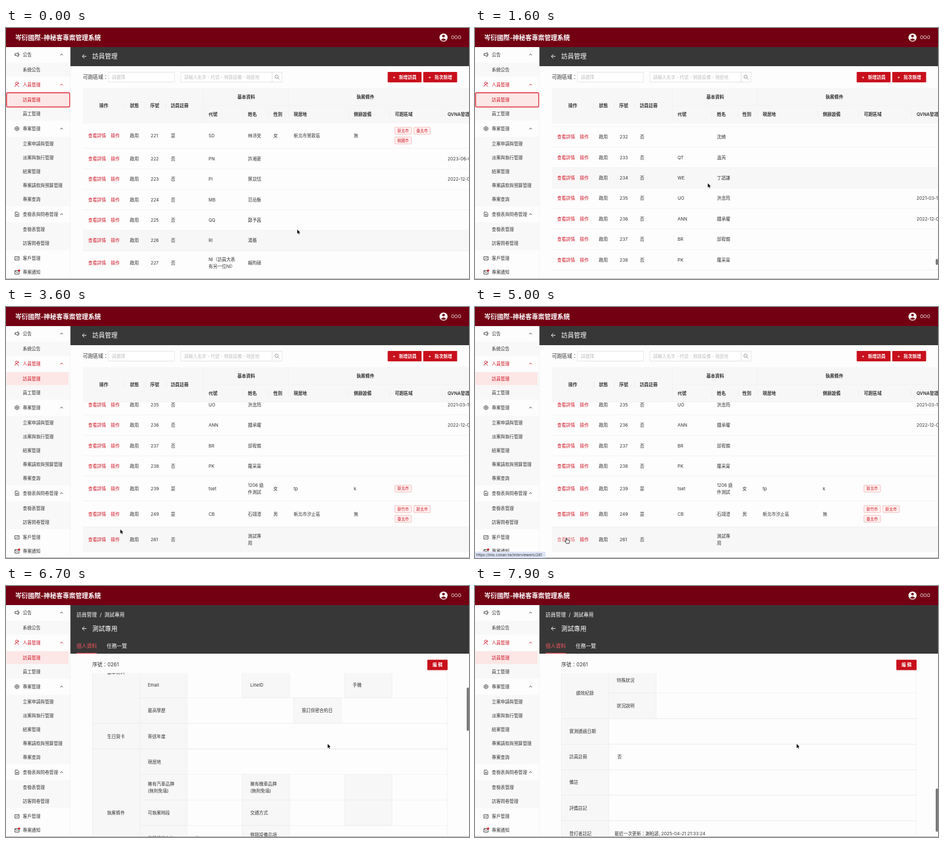
Animation, 800 px wide and 434 px high, one loop 8 s. Source, as an HTML page:

```html
<!DOCTYPE html>
<html lang="zh-Hant">
<head>
<meta charset="utf-8">
<style>
html, body { margin: 0; width: 100%; height: 100%; overflow: hidden; background: #fdfdfd; }
svg { display: block; width: 800px; height: 434px; }
text { font: 7.65px Inter, "Noto Sans CJK TC", "Noto Sans CJK", sans-serif; fill: #333; white-space: pre; }
.b { font-weight: 600; }
.m { font-size: 8.75px; }
.l { font-size: 10.9px; font-weight: 500; }
.h { font-size: 11px; font-weight: 600; }
.s { font-size: 6.6px; }
.w { fill: #fff; }
.r { fill: #cf1322; }
.p { fill: #f0565c; }
.g { fill: #bfbfbf; }
.c { text-anchor: middle; }
.icon { fill: none; stroke: #333; stroke-width: .9; }
.icon.red { stroke: #cf1322; }
</style>
</head>
<body>
<svg id="stage" viewBox="0 0 800 434"></svg>
<script>
const $ = id => document.getElementById(id);
const rect = (x, y, w, h, fill, more = '') =>
  `<rect x="${x}" y="${y}" width="${w}" height="${h}" fill="${fill}" ${more}/>`;
const path = (d, more = 'class="icon"') => `<path d="${d}" ${more}/>`;
const line = (x1, y1, x2, y2, color = '#eee') =>
  path(`M${x1} ${y1}L${x2} ${y2}`, `fill="none" stroke="${color}" stroke-width=".7"`);
const sizes = { h: 11, l: 10.9, m: 8.75, s: 6.6 };

// y is the vertical centre of the text block
function text(x, y, str, cls = '') {
  const size = sizes[cls.split(' ')[0]] || 7.65;
  const lines = str.split('\n');
  return lines.map((s, i) => {
    const base = y + size * .37 + (i - (lines.length - 1) / 2) * 12;
    return `<text x="${x}" y="${base.toFixed(2)}" class="${cls}">${s}</text>`;
  }).join('');
}

const button = (x, y, w, h, label) =>
  rect(x, y, w, h, '#c8101c', 'rx="1"') + text(x + w / 2, y + h / 2, label, 'w c b');

const backArrow = y => path(`M139 ${y}H132M135.3 ${y - 3.4}L131.8 ${y}L135.3 ${y + 3.4}`,
  'fill="none" stroke="#fff" stroke-width="1"');

// ---- frame shared by both pages
const topBar = rect(0, 0, 800, 33, '#730012') +
  text(16, 16.5, '岑衍國際-神秘客專案管理系統', 'h w') +
  '<circle cx="756" cy="16.5" r="7" fill="#fff"/><circle cx="756" cy="14" r="2.3" fill="#730012"/>' +
  path('M751.5 20.5Q756 15.5 760.5 20.5Q756 24 751.5 20.5Z', 'fill="#730012"') +
  text(769, 16.5, 'OOO', 'w');

const icons = {
  46: 'M15.5 44.5H18L21 42.5V49.5L18 47.5H15.5ZM22.5 44.5V47.5',
  98: 'M20.5 95.5A2 2 0 1 1 16.5 95.5A2 2 0 1 1 20.5 95.5M15.3 101.5Q16 98 18.5 98L22.5 101.5M21 94L22 97',
  174: 'M19 170.3L22.3 172.2V175.8L19 177.7L15.7 175.8V172.2ZM20.4 174A1.4 1.4 0 1 1 17.6 174A1.4 1.4 0 1 1 20.4 174',
  322: 'M16 318.3H20L22 320.3V325.7H16ZM17.5 322.7H20.5M19 321.2V324.2',
  398: 'M15.3 395.3H22.7V401.2H15.3ZM17 399.4L18.7 397.6L19.7 398.7L21.5 396.8',
  422: 'M15.3 419.5H22.7V425.5H15.3ZM15.3 420L19 423L22.7 420'
};
const menuItems = [
  [46, '公告', 1], [72, '系統公告'], [98, '人員管理', 1], [124, '訪員管理'], [148, '員工管理'],
  [174, '專案管理', 1], [200, '立案申請與管理'], [224, '派案與執行管理'], [248, '結案管理'],
  [272, '專案請款與預算管理'], [296, '專案查詢'], [322, '查檢表與問卷管理', 1],
  [348, '查檢表管理'], [372, '訪客問卷管理'], [398, '客戶管理'], [422, '專案通知']
];
const sidebar = rect(0, 33, 111, 401, '#fdfdfd') +
  [[60, 24], [112, 48], [188, 120], [336, 48]].map(([y, h]) => rect(0, y, 111, h, '#f8f8f8')).join('') +
  rect(1, 113, 107, 22, '#fde6e6') +
  menuItems.map(([y, label, open]) => {
    const red = y === 98 || y === 124;
    const cls = `class="icon ${red ? 'red' : ''}"`;
    return text(29, y, label, red ? 'r' : '') + (icons[y] ? path(icons[y], cls) : '') +
      (open ? path(`M93.7 ${y + 1.2}L96 ${y - 1.2}L98.3 ${y + 1.2}`, cls) : '');
  }).join('') +
  '<circle cx="22.7" cy="419.3" r="1.8" fill="#d9121f"/>' +
  line(111, 33, 111, 434) +
  rect(1, 112, 109, 24.5, 'none', 'id="focus" rx="2" stroke="#e8505a" stroke-width="1.8"');

// ---- list page: number, code, name, extra cells
const people = [
  [221, 'SD', '林沛芠', { sex: '女', home: '新北市鶯歌區', gear: '無', tags: ['新北市', '臺北市', '桃園市'], h: 44.5 }],
  [222, 'PN', '許湘菱', { date: '2023-06-05' }], [223, 'PI', '葉苡恬', { date: '2022-12-01' }],
  [224, 'MB', '范岳衡'], [225, 'QQ', '鄭予茜'], [226, 'RI', '湯蕎'],
  [227, 'NI（訪員大表\n有另一位NI）', '賴昀碩', { h: 42.5 }],
  [228, 'RC', '周芷瑄', { date: '2021-03-31' }], [229, '', '何小禾'],
  [230, 'YQ', '江映彤', { date: '2023-10-15' }], [232, '', '沈綺'], [233, 'QT', '溫芮'], [234, 'WE', '丁語謙'],
  [235, 'UO', '洪念筠', { date: '2021-03-15' }], [236, 'ANN', '鍾承曜', { date: '2022-12-05' }],
  [237, 'BR', '邱宥嫻'], [238, 'PK', '羅采甯'],
  [239, 'tset', '1206 退\n件測試', { sex: '女', home: 'tp', gear: 'k', tags: ['新北市'], h: 42.5 }],
  [249, 'CB', '石翊澄', { sex: '男', home: '新北市汐止區', gear: '無', tags: ['新竹市', '新北市', '臺北市'], h: 45 }],
  [261, '', '測試專\n用', { h: 43 }]
];
let listBottom = 163.8;
const rows = people.map(([no, code, name, x = {}]) => {
  const h = x.h || 35.4, y = listBottom, mid = y + h / 2;
  listBottom += h;
  const tags = (x.tags || []).map((s, i, all) => {
    const tx = 672 + i % 2 * 32.7;
    const ty = mid + (all.length > 2 ? (i < 2 ? -8.4 : 8.4) : 0);
    return rect(tx, ty - 6, 28.5, 12, '#fff1f0', 'rx="1" stroke="#f3a6a6" stroke-width=".7"') +
      text(tx + 14.25, ty, s, 's r c');
  }).join('');
  const svg = `<g class="link">${text(142, mid, '查看詳情', 'r')}</g>` + text(181, mid, '操作', 'r') +
    text(214, mid, '啟用') + text(250, mid, String(no)) + text(285, mid, x.sex ? '是' : '否') +
    text(350, mid, code) + text(418, mid, name) + text(462, mid, x.sex || '') + text(497, mid, x.home || '') +
    text(601, mid, x.gear || '') + tags + text(763, mid, x.date || '') + line(133, listBottom, 800, listBottom);
  return { y, h, svg };
});

const heads = [[169, 134, '操作'], [222, 134, '狀態'], [257, 134, '序號'], [300, 134, '訪員註冊'],
  [415, 119, '基本資料'], [621, 119, '執案條件']];
const subHeads = [[350, '代號'], [418, '姓名'], [462, '性別'], [497, '現居地'], [601, '側錄設備'],
  [672, '可跑區域'], [763, 'QVNA發證日']];
const tableHead = rect(133, 104, 667, 60, '#f7f7f7') +
  heads.map(([x, y, s]) => text(x, y, s, 'b c')).join('') +
  subHeads.map(([x, s]) => text(x, 149, s, 'b')).join('') +
  [205, 241, 276].map(x => line(x, 128, x, 140, '#e8e8e8')).join('') +
  [409, 454, 488, 592, 663, 754].map(x => line(x, 143, x, 155, '#e8e8e8')).join('') +
  line(341, 104, 341, 164) + line(488, 104, 488, 134) + line(341, 134, 800, 134) + line(133, 164, 800, 164);

const field = 'stroke="#d9d9d9" stroke-width=".7"';
const listPage = rect(111, 33, 689, 33, '#373737') + backArrow(49) + text(149, 49, '訪員管理', 'l w') +
  text(133, 85, '可跑區域：', 'm') +
  rect(177, 76.5, 114, 17, '#fff', field) + text(183, 85, '請選擇', 'g') +
  rect(302, 76.5, 158, 17, '#fff', field) + text(308, 85, '請輸入名字、代號、側錄設備、現居地', 'g') +
  rect(460, 76.5, 17, 17, '#fff', field) +
  path('M470.3 84.2A2.8 2.8 0 1 1 464.7 84.2A2.8 2.8 0 1 1 470.3 84.2M469.5 86.3L472 88.8',
    'fill="none" stroke="#777" stroke-width=".8"') +
  button(659.5, 76, 58.5, 18, '+   新增訪員') + button(721, 76, 58.5, 18, '+   批次新增') +
  '<g clip-path="url(#listClip)">' + rect(133, 0, 667, 35, '#f7f7f7', 'id="hover"') +
  '<g id="rows">' + rows.map(r => r.svg).join('') + '</g></g>' + tableHead;

// ---- detail page: sections of rows; each row is [labels, values, height]
const sections = [
  ['基本資料', [
    [[[231, '身分證字號'], [408, '姓名'], [585, '代號']], [[323, 'B135792468'], [505, '測試專用']]],
    [[[231, '性別'], [408, '生日'], [585, '婚姻']], [[328, '其他'], [500, '2025/02/04']]],
    [[[231, 'Email'], [408, 'LineID'], [585, '手機']]],
    [[[231, '最高學歷'], [497, '簽訂保密合約日']]]]],
  ['生日賀卡', [[[[231, '寄送年度']]]]],
  ['執案條件', [
    [[[231, '現居地']]],
    [[[231, '擁有汽車品牌\n(無則免填)'], [408, '擁有機車品牌\n(無則免填)'], [585, '']]],
    [[[231, '可執案時段'], [408, '交通方式'], [585, '']]],
    [[[231, '側錄設備有無'], [408, '側錄設備品項\n(無則免填)']], [[328, '無']]],
    [[[231, '可跑區域'], [497, '手機品牌']]]]],
  ['能力培訓', [
    [[[231, '證照有無及意願']]],
    [[[231, 'QVAA/發證日'], [408, 'VQN/發證日'], [585, '顧問神秘客/發證日', 90]]],
    [[[231, '神秘客培訓經歷\n(請填寫接受神\n秘客培訓的課程\n名稱)'], [497, '課程完訓日期']], [], 59]]],
  ['工作經歷', [[[[231, '產業']]], [[[231, '職務']]], [[[231, '年資']]]]],
  ['績效紀錄', [[[[231, '特殊狀況']]], [[[231, '狀況說明']]]]],
  ...[['實測通過日期'], ['訪員註冊', 246, '否'], ['備註'], ['評鑑註記'],
    ['登打者註記', 241, '最近一次更新：謝柏諺, 2025-04-21 21:33:24']]
    .map(([name, x, value]) => [name, [[[], x ? [[x, value]] : []]], true])
];
const edge = 'stroke="#ececec" stroke-width=".7"';
let bottom = 151;
const detailRows = sections.map(([name, list, alignLeft]) => {
  const start = bottom;
  const body = list.map(([labels, values = [], h = 44.15]) => {
    const y = bottom, mid = y + h / 2;
    bottom += h;
    return line(231, y, 763, y) +
      labels.map(([x, s, w = 82]) => rect(x, y, w, h, '#f7f7f7', edge) + text(x + 14, mid, s)).join('') +
      values.map(([x, s]) => text(x, mid, s)).join('');
  }).join('');
  const h = bottom - start;
  return rect(149.5, start, 613, h, 'none', edge) + rect(149.5, start, 82, h, '#f7f7f7', edge) + body +
    text(alignLeft ? 163 : 190, start + h / 2, name, alignLeft ? '' : 'c');
}).join('');

const detailPage = rect(111, 33, 689, 84, '#373737') + text(122, 50, '訪員管理  /  測試專用', 'm w') +
  backArrow(73.5) + text(149, 73.5, '測試專用', 'l w') +
  text(122, 103.5, '個人資料', 'm p') + text(174, 103.5, '任務一覽', 'm w') + rect(122, 115.7, 35, 1.3, '#f0565c') +
  text(149, 136, '序號：0261', 'm') + button(728, 127.5, 35, 18, '編 輯') +
  `<g clip-path="url(#detailClip)"><g id="detailRows">${detailRows}</g></g>`;

const arrow = path('M0 0V8.3L1.9 6.6L3.1 9.3L4.6 8.6L3.4 6H5.9Z',
  'fill="#000" stroke="#fff" stroke-width=".6" id="arrow"');
const hand = path('M-1.8 0V-4Q-1 -5.4 -.3 -4V-1.2Q1 -2 1.6 -.9Q2.7 -1.5 3.2 -.3Q4.4 -.6 4.4 1L3.7 4.8H-1L-3.6 1.2Q-3.3 .1 -1.8 1.4Z',
  'fill="#fff" stroke="#000" stroke-width=".8" id="hand"');

$('stage').innerHTML = `<defs><clipPath id="listClip">${rect(133, 164, 667, 259.5, '#000')}</clipPath>
  <clipPath id="detailClip">${rect(149, 150.6, 615, 283, '#000')}</clipPath></defs>` +
  rect(0, 0, 800, 434, '#fdfdfd') + `<g id="list">${listPage}</g><g id="detail">${detailPage}</g>` +
  sidebar + topBar + rect(0, 433.2, 800, .8, '#999') +
  rect(796, 0, 4, 11, '#7a7a7a', 'rx="2" id="thumb"') +
  `<g id="status">${rect(0, 423, 122, 11, '#dde4f6', 'rx="1"')}
  <text x="2" y="430.6" style="font-size:6.4px">https://mis.conan.tw/interviewers/261</text></g>` +
  arrow + hand;

// ---- motion
const show = (id, on) => $(id).setAttribute('visibility', on ? 'visible' : 'hidden');
const move = (id, x, y) => $(id).setAttribute('transform', `translate(${x} ${y})`);
const smooth = k => k * k * (3 - 2 * k);
const lastLink = [...document.querySelectorAll('.link')].pop();

function track(keys, t, ease = k => k) {
  const i = keys.findIndex(key => key[0] > t);
  if (i < 0) return keys[keys.length - 1].slice(1);
  if (i === 0) return keys[0].slice(1);
  const a = keys[i - 1], b = keys[i], k = ease((t - a[0]) / (b[0] - a[0]));
  return a.slice(1).map((v, j) => v + (b[j + 1] - v) * k);
}

const pointer = [[0, 503, 348], [600, 402, 268], [2800, 402, 268], [3700, 190, 388], [4200, 190, 388],
  [4600, 159, 404], [5200, 159, 404], [5600, 458.5, 304.5], [6200, 555.5, 272.5]];
const listScroll = [[900, 0], [1200, 149], [1500, 325], [1800, 440], [2100, 489]];
const detailScroll = [[6400, 0], [6700, 90], [7200, 349.6], [7600, 600], [7900, 731.3]];

function draw() {
  const t = Math.floor(performance.now() % 8000 / 100) * 100;
  const onList = t < 5200, onLink = t >= 4600 && onList;
  const [x, y] = track(pointer, t, smooth);
  const [scroll] = track(onList ? listScroll : detailScroll, t);

  show('list', onList);
  show('detail', !onList);
  show('focus', t < 3200);
  show('status', t >= 4600 && t < 5500);
  show('arrow', !onLink);
  show('hand', onLink);
  move('arrow', x, y);
  move('hand', x, y);
  move(onList ? 'rows' : 'detailRows', 0, -scroll);
  lastLink.style.opacity = onLink ? .6 : 1;

  const row = rows.find(r => y + 4 + scroll < r.y + r.h) || rows[rows.length - 1];
  $('hover').setAttribute('y', row.y - scroll);
  $('hover').setAttribute('height', row.h);

  show('thumb', onList ? t >= 1000 && t < 2700 : t >= 6500);
  $('thumb').setAttribute('y', onList ? 385.3 + scroll * .0382 : 151 + scroll * .272);
  $('thumb').setAttribute('height', onList ? 10.5 : 75);
  requestAnimationFrame(draw);
}
draw();
</script>
</body>
</html>
```
